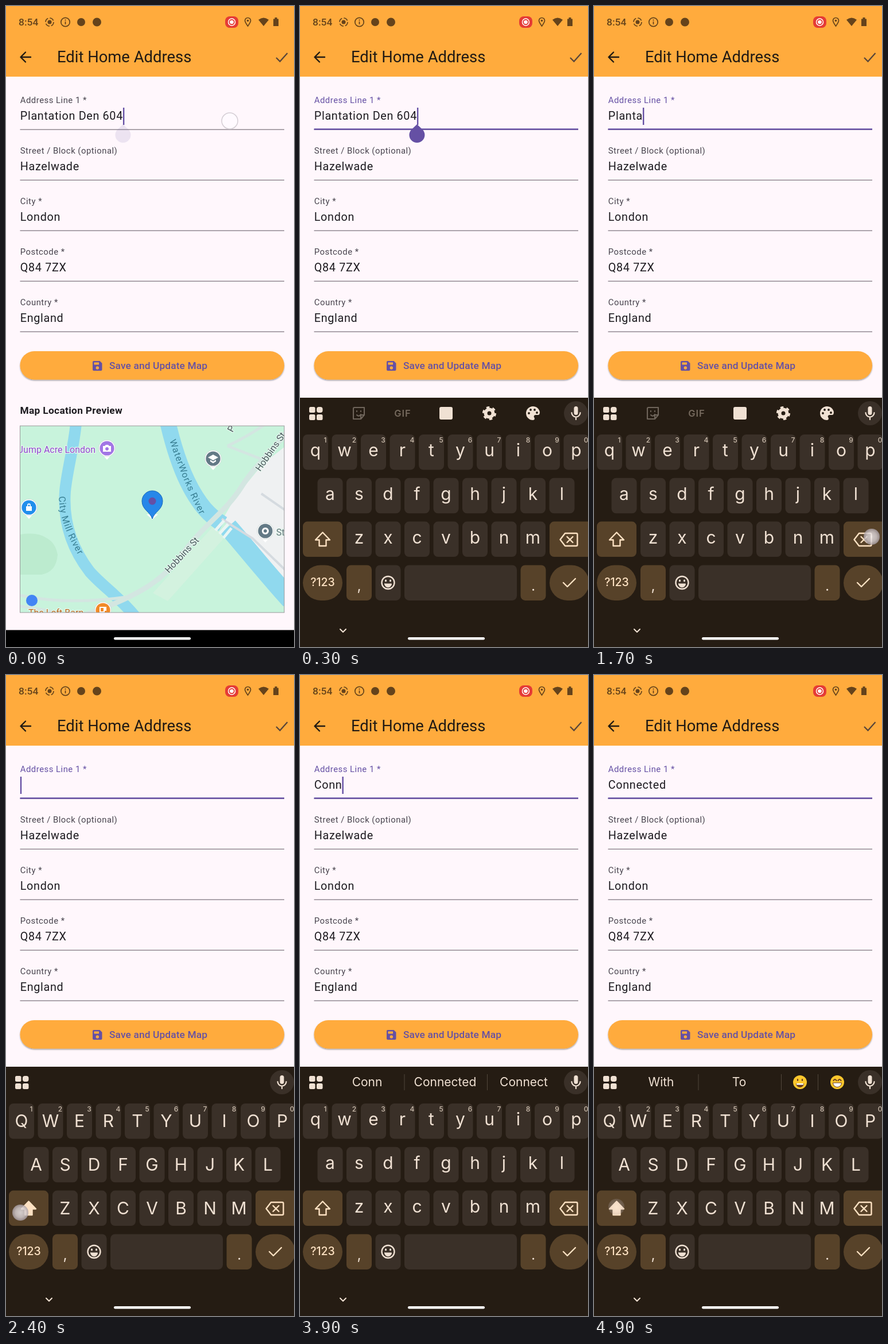
Recreate the animation shown at these times as an HTML page. Size 502 by 1116 pixels, loop 5000 ms.

```html
<!DOCTYPE html>
<html lang="en">
<head>
<meta charset="utf-8">
<style>
html, body { margin: 0; width: 100%; height: 100%; overflow: hidden; background: #fff7fc; }
svg { display: block; width: 502px; height: 1116px; }
text { font-family: Roboto, sans-serif; white-space: pre; }
.label { font-size: 14.86px; letter-spacing: .5px; fill: #49454f; }
.value { font-size: 19.8px; letter-spacing: .66px; fill: #1d1b20; }
#keyboard text { font-family: Inter, sans-serif; fill: #f0e1d3; text-anchor: middle; }
#keyboard .letter { font-size: 30px; }
#keyboard .hint { font-size: 12px; font-weight: 500; fill: #cfc0b0; }
#keyboard .word { font-size: 21px; }
.map-label { font-size: 16px; stroke: #e6f8ee; stroke-width: 2.5px; paint-order: stroke; }
.river-label { fill: #397f93; stroke: none; letter-spacing: .9px; }
.river { fill: none; stroke: #90d9ee; }
.road { fill: none; stroke: #d3e6e1; }
.line { fill: none; stroke-linecap: round; stroke-linejoin: round; }
</style>
</head>
<body>
<svg viewBox="0 0 502 1116">
  <defs>
    <clipPath id="mapClip"><rect x="25" y="731" width="460" height="325"/></clipPath>
    <filter id="shadow" x="-5%" y="-20%" width="110%" height="150%">
      <feDropShadow dx="0" dy="1.5" stdDeviation="1.3" flood-opacity=".4"/>
    </filter>
    <radialGradient id="touchFill">
      <stop offset="0" stop-color="#f3eff2"/><stop offset=".6" stop-color="#d9d2d6"/><stop offset="1" stop-color="#a69ca1"/>
    </radialGradient>
    <path id="millText" d="M92 854C94 890 103 920 138 976"/>
    <path id="waterText" d="M285 757C300 800 315 845 352 912"/>
  </defs>
  <rect width="502" height="1116" fill="#fff7fc"/>
  <rect width="502" height="123" fill="#ffab3d"/>

  <g id="status" fill="#65431b">
    <text x="22" y="34" font-size="17.4" font-weight="500">8:54</text>
    <g fill="none" stroke="#65431b" stroke-width="1.7">
      <circle cx="76" cy="28" r="7" stroke-dasharray="8 3"/>
      <circle cx="103.500" cy="28" r="7.700"/>
      <path d="M103.500 27v5M103.500 23.500v2"/>
    </g>
    <circle cx="76" cy="28" r="3.500"/>
    <circle cx="131" cy="28" r="7"/>
    <circle cx="158.500" cy="28" r="7.500"/>
    <rect x="382" y="18" width="23" height="20" rx="8" fill="#e53b35"/>
    <circle cx="393.500" cy="28" r="6" fill="none" stroke="#fff" stroke-width="1.500"/>
    <circle cx="393.500" cy="28" r="3.300" fill="#fff"/>
    <path d="M421.500 35C418 30 416.500 28 416.500 25.500a5 5 0 0 1 10 0c0 2.500-1.500 4.500-5 9.500z" fill="none" stroke="#65431b" stroke-width="1.700"/>
    <circle cx="421.500" cy="25.500" r="1.800"/>
    <path d="M440 24q9-7 18 0l-9 11z"/>
    <path d="M466 22.500h2.500V20h4v2.500h2.500V35h-9z"/>
  </g>
  <path class="line" d="M43 89H26m8-8.500L25.500 89l8.500 8.500" stroke="#211a12" stroke-width="2.400"/>
  <text x="89" y="98" font-size="27.4" fill="#211a14">Edit Home Address</text>
  <path d="M471 90l6.500 6.500L490.500 82" fill="none" stroke="#5a463a" stroke-width="2.300"/>

  <g id="fields"></g>
  <rect id="focusLine" x="24.500" y="213.300" width="460.500" height="2.500" fill="#6550a4"/>
  <text id="entry" class="value" x="24.800" y="197.500"></text>
  <rect id="cursor" y="177" width="2.400" height="30" fill="#6550a4"/>
  <path id="handle" d="M204 206l9.500 9a13.500 13.500 0 1 1-19 0z" fill="#6550a4"/>

  <rect x="24.500" y="601" width="460.500" height="49.500" rx="24.700" fill="#ffab3d" filter="url(#shadow)"/>
  <path d="M153 618h10.500l4 4v11a2 2 0 0 1-2 2H153a2 2 0 0 1-2-2v-13a2 2 0 0 1 2-2z" fill="#6550a4"/>
  <path d="M153.500 620.500h8.500v4h-8.500z" fill="#ffab3d"/>
  <circle cx="159.300" cy="630" r="2.700" fill="#ffab3d"/>
  <text x="180" y="632" font-size="17.33" font-weight="500" letter-spacing=".12" fill="#6550a4">Save and Update Map</text>
  <text x="24.500" y="710" font-size="17.33" font-weight="700" letter-spacing=".31" fill="#1d1b20">Map Location Preview</text>

  <g clip-path="url(#mapClip)">
    <rect x="25" y="731" width="460" height="325" fill="#c8f3dc"/>
    <path d="M25 920Q55 915 72 927Q86 935 90 955Q88 985 62 990H25z" fill="#bcebcf"/>
    <path d="M485 768L448 797L400 855L378 893L400 915L485 1012z" fill="#eff1f2"/>
    <path d="M362 905L384 922L282 1036L256 1022z" fill="#d3f2df"/>
    <path class="river" d="M122 725C120 760 106 810 103 845C99 900 116 946 146 985C170 1012 199 1030 226 1064" stroke-width="20"/>
    <path class="river" d="M282 725C296 785 315 838 346 875Q360 891 378 902" stroke-width="28"/>
    <path class="river" d="M387 907C412 935 443 975 496 1034" stroke-width="34"/>
    <g class="road">
      <path d="M500 722C480 765 440 790 410 838C382 882 345 902 306 956C270 1005 222 1030 138 1060" stroke-width="9"/>
      <path d="M386 766Q430 745 460 722M386 766L448 790M20 1025Q105 1044 210 1029M20 1044Q80 1052 130 1066" stroke-width="5"/>
      <path d="M376 893L430 927L490 985M490 880L445 849" stroke="#d5dbe0" stroke-width="4"/>
      <path d="M365 913l15-17m-8 23l15-17m-8 24l14-17" stroke="#eaf5f3" stroke-width="5"/>
    </g>
    <g class="map-label">
      <text class="river-label"><textPath href="#millText">City Mill River</textPath></text>
      <text class="river-label"><textPath href="#waterText">WaterWorks River</textPath></text>
      <text transform="translate(284 988) rotate(-47)" fill="#48575c">Hobbins St</text>
      <text transform="translate(443 811) rotate(-55)" fill="#48575c">Hobbins St</text>
      <text transform="translate(395 743) rotate(-62)" fill="#48575c">P</text>
      <text x="156" y="778" text-anchor="end" fill="#9149cf">Jump Acre London</text>
      <text x="471" y="922" fill="#66777d">St</text>
      <text x="39" y="1062" fill="#bd6820">The Loft Barn</text>
    </g>
    <g id="pins"></g>
    <path d="M245 885L255 894L265 885z" fill="#fff"/>
    <path d="M255 893C251 880 237 877 237 862a18 18 0 0 1 36 0C273 877 259 880 255 893z" fill="#2687e9" stroke="#1769b8"/>
    <circle cx="255" cy="862" r="6.500" fill="#654fa5"/>
    <circle cx="45" cy="1035" r="10" fill="#4285f4"/>
  </g>
  <rect x="24.500" y="731" width="460.500" height="325" fill="none" stroke="#99979a"/>
  <rect y="1086.500" width="502" height="30"/>

  <g id="keyboard">
    <rect y="682" width="502" height="440" fill="#251c13"/>
    <g fill="#f0e1d3">
      <rect x="16" y="698" width="10.500" height="10" rx="2.500"/><rect x="29" y="698" width="10.500" height="10" rx="4"/>
      <rect x="16" y="711" width="10.500" height="10" rx="2.500"/><rect x="29" y="711" width="10.500" height="10" rx="2.500"/>
    </g>
    <circle cx="481" cy="709" r="21" fill="#3a3028"/>
    <rect x="477.500" y="697" width="7" height="15" rx="3.500" fill="#f0e1d3"/>
    <path class="line" d="M473.500 708a7.500 7.500 0 0 0 15 0M481 716v4" stroke="#f0e1d3" stroke-width="2.200"/>
    <g id="tools">
      <path class="line" d="M95 699h17v13l-6 7H93v-18a2 2 0 0 1 2-2zM112 712h-6v7M99 712q4 4 7-1M99 705v1M106 705v1" stroke="#6f655b" stroke-width="2.100"/>
      <text x="179" y="715" font-size="16.500" font-weight="600" letter-spacing="1" style="fill:#75695d">GIF</text>
      <rect x="243" y="698" width="23" height="22" rx="3" fill="#f0e1d3"/>
      <circle cx="330" cy="709" r="6.500" fill="none" stroke="#f0e1d3" stroke-width="6"/>
      <circle cx="330" cy="709" r="10.300" fill="none" stroke="#f0e1d3" stroke-width="3.500" stroke-dasharray="5.390"/>
      <path d="M406 697a12 12 0 1 0 0 24c4 0 3-4 2-5c-1-3 1-4 3-4h4q3 0 3-5c-1-6-6-10-12-10z" fill="#f0e1d3"/>
      <path class="line" d="M399 709h0M402 703h0M409 703h0M413 708h0" stroke="#251c13" stroke-width="3.800"/>
    </g>
    <g id="words">
      <text class="word" x="117" y="716"></text><text class="word" x="253" y="716"></text><text class="word" x="390" y="716"></text>
      <path d="M182 695v28M326.500 695v28" stroke="#51463c"/>
    </g>
    <g id="emojis">
      <path d="M390.500 695v28" stroke="#51463c"/>
      <circle cx="359" cy="709" r="12" fill="#fcc72d"/><circle cx="424" cy="709" r="12" fill="#fcc72d"/>
      <path d="M352 711h14a7 7 0 0 1-14 0z" fill="#663b20"/><path d="M353 711h12v2.500h-12z" fill="#fff"/>
      <path d="M416.500 710h15a7.500 7.500 0 0 1-15 0z" fill="#fff" stroke="#663b20"/>
      <path class="line" d="M355 704v2M363 704v2M417.500 706q2.500-4 5 0M425.500 706q2.500-4 5 0" stroke="#663b20" stroke-width="2.200"/>
    </g>
    <g id="keys"></g>
    <g class="line" stroke="#fde1c2" stroke-width="2.400">
      <path id="shift" d="M39.500 916.500l12.500 13h-6.500v10.500h-12v-10.500H27z"/>
      <path d="M462 918h19.500a2 2 0 0 1 2 2v18a2 2 0 0 1-2 2H462l-8.500-11zM465.500 924l10 10m0-10l-10 10"/>
      <path d="M459 1004l7 7l14-14"/>
      <path d="M70 1085l5 5l5-5" stroke="#f0e1d3" stroke-width="2"/>
      <g stroke="#f0e1d3">
        <circle cx="153.500" cy="1004" r="11"/>
        <path d="M149.500 1000v1M157.500 1000v1" stroke-width="3"/>
        <path d="M147.500 1006h12a6 6 0 0 1-12 0z" fill="#f0e1d3" stroke-width="1"/>
      </g>
    </g>
    <text x="39.500" y="1010" font-size="19.500" font-weight="500" style="fill:#fde1c2">?123</text>
    <text x="103" y="1018" font-size="25">,</text><text x="406.500" y="1018" font-size="25">.</text>
  </g>
  <rect x="188" y="1099" width="134" height="4.500" rx="2.200" fill="#fff"/>
  <circle id="touch" r="14"/>
</svg>
<script>
const $ = id => document.getElementById(id);
const set = (el, attrs) => { for (const k in attrs) el.setAttribute(k, attrs[k]); };
const show = (el, on) => set(el, { visibility: on ? 'visible' : 'hidden' });
const START_TEXT = 'Plantation Den 604';

const fields = [['Address Line 1 *', ''], ['Street / Block (optional)', 'Hazelwade'], ['City *', 'London'],
  ['Postcode *', 'Q84 7ZX'], ['Country *', 'England']];
$('fields').innerHTML = fields.map(([label, value], i) => {
  const y = 88 * i;
  return `<text class="label" x="24.8" y="${169 + y}">${label}</text>
    <text class="value" x="24.8" y="${197.5 + y}">${value}</text>
    <path d="M24.500 ${215.2 + y}H485" stroke="#7d747e" stroke-width="1.3"/>`;
}).join('');
const focusLabel = $('fields').querySelector('text');

const pin = (x, y, color, icon) => `<g transform="translate(${x} ${y})">
  <path d="M-7 12L0 20L7 12z" fill="#fff"/>
  <circle r="14.5" fill="#fff" stroke="#bccbc6" stroke-width=".6"/><circle r="12.6" fill="${color}"/>
  <path d="${icon}" fill="#fff" fill-rule="evenodd"/></g>`;
$('pins').innerHTML =
  pin(176, 770, '#a276e5', 'M-7-4h3l2-2h4l2 2h3V6H-7zM0-2a3 3 0 1 0 .1 0z') +
  pin(361, 788, '#637a86', 'M-9-2L0-7L9-2L0 3zM-5 2L0 5L5 2V5L0 8L-5 5z') +
  pin(40, 873, '#218fec', 'M-5-2h2v-2a3 3 0 0 1 6 0v2h2V6H-5zM-1.500-2h3v-2q-1.500-2-3 0z') +
  pin(452, 914, '#637a86', 'M0-6a6 6 0 1 0 .1 0zM0-3a3 3 0 1 1-.1 0z') +
  pin(169, 1052, '#f18a28', 'M-6-6H6V1H3V5H-6zM-4-4V2H1V-4z');

const PITCH = 50.5;
const key = (x, row, width = 44, color = '#3a3028', radius = 8) =>
  `<rect x="${x}" y="${746 + 75.8 * row}" width="${width}" height="61.5" rx="${radius}" fill="${color}"/>`;
const BROWN = '#574229';
let keys = key(5, 2, 69, BROWN) + `<g id="delete">${key(435, 2, 74, BROWN)}</g>` +
  key(5, 3, 69, BROWN, 31) + key(81, 3, 44, BROWN) + key(131.5, 3) + key(182, 3, 196) +
  key(384.5, 3, 44, BROWN) + key(435, 3, 69, BROWN, 31);
[['qwertyuiop', 5], ['asdfghjkl', 30.5], ['zxcvbnm', 81]].forEach(([chars, left], row) => {
  [...chars].forEach((char, i) => {
    const x = left + PITCH * i;
    keys += key(x, row) + `<text class="letter" x="${x + 22}" data-row="${row}">${char}</text>`;
    if (!row) keys += `<text class="hint" x="${x + 39}" y="760">${(i + 1) % 10}</text>`;
  });
});
$('keys').innerHTML = keys;
const letters = [...document.querySelectorAll('.letter')];
const words = [...$('words').querySelectorAll('text')];
const deleteKey = $('delete').firstElementChild;

// time, entry, suggestions
const typing = [
  [2000, '', []],
  [2800, 'C', ['C', 'Can', 'Call']],
  [3200, 'Co', ['Co', 'Come', 'Could']],
  [3500, 'Con', ['Con', 'Cone', 'Contact']],
  [3800, 'Conn', ['Conn', 'Connected', 'Connect']],
  [4300, 'Connected ', ['With', 'To', '']]
];
// start, end, x, y
const touches = [[0, 100, 390, 200], [700, 1400, 486, 926], [1400, 2100, 484, 924], [2400, 2600, 25, 936],
  [2800, 2900, 204, 926], [3200, 3300, 432, 774], [3500, 3600, 355, 926], [3800, 3900, 355, 926],
  [4300, 4400, 253, 709], [4800, 5000, 39, 926]];

function entryAt(t) {
  const step = typing.findLast(s => t >= s[0]);
  if (step) return { text: step[1], words: step[2], since: step[0] };
  const removed = t < 800 ? 0 : t < 1200 ? 1 : 1 + (t - 1150) / 50;
  return { text: START_TEXT.slice(0, START_TEXT.length - removed), words: [], since: t };
}

function draw(t) {
  const entry = entryAt(t), focused = t >= 100;
  $('entry').textContent = entry.text;
  const end = 24.8 + (entry.text ? $('entry').getComputedTextLength() : 0);
  set($('cursor'), { x: end });
  show($('cursor'), (t - entry.since) % 1000 < 500);
  show($('focusLine'), focused);
  focusLabel.style.fill = focused ? '#6550a4' : '';
  set($('handle'), { opacity: t < 800 ? Math.min(1, .12 + t / 220) : 0, transform: `translate(${end - 204} 0)` });

  const drop = 434 * Math.max(0, 1 - t / 300) ** 1.516;
  set($('keyboard'), { transform: `translate(0 ${drop})` });
  show($('keyboard'), t > 0);

  const caps = t >= 2400 && t < 2800 || t >= 4800;
  for (const el of letters) {
    el.textContent = caps ? el.textContent.toUpperCase() : el.textContent.toLowerCase();
    set(el, { y: 776.7 + 75.8 * el.dataset.row + (caps ? 10.5 : 7.5) });
  }
  set($('shift'), { fill: caps ? '#fde1c2' : 'none' });
  set(deleteKey, { fill: t >= 700 && t < 1200 ? '#6a543d' : BROWN });

  $('tools').style.display = t < 2400 ? '' : 'none';
  $('words').style.display = entry.words.length ? '' : 'none';
  $('emojis').style.display = t >= 4300 ? '' : 'none';
  words.forEach((el, i) => { el.textContent = entry.words[i] || ''; });

  const touch = touches.find(([from, to]) => t >= from && t < to);
  show($('touch'), touch);
  if (touch) set($('touch'), {
    cx: touch[2], cy: touch[3],
    fill: t < 100 ? '#fffaff' : 'url(#touchFill)',
    stroke: t < 100 ? '#d5ced5' : 'none', 'stroke-width': 1.5,
    opacity: t < 100 ? 1 : t >= 4900 ? .25 : .8
  });
}

function frame() {
  draw(Math.floor(performance.now() % 5000 / 100) * 100);
  requestAnimationFrame(frame);
}
frame();
</script>
</body>
</html>
```
